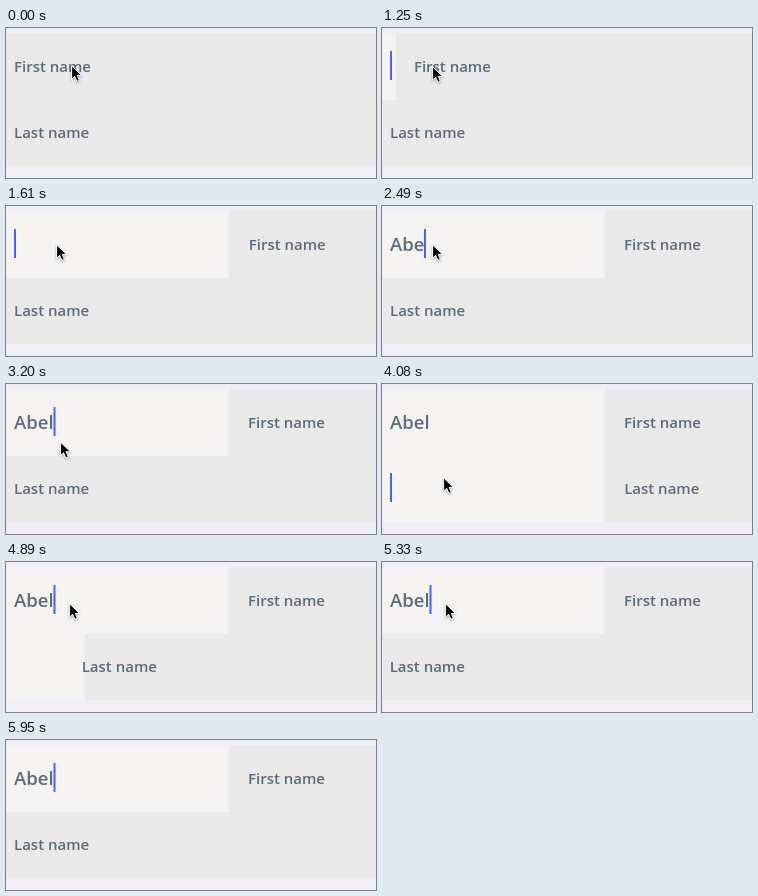
Write an HTML page that moves like this. It is 370 px wide and 150 px high and loops after 6130 ms.

```html
<!DOCTYPE html>
<html lang="en">
<head>
<meta charset="utf-8">
<title>Sliding form fields</title>
<style>
  html, body { margin: 0; width: 100%; height: 100%; overflow: hidden; }
  body { background: #efeef4; }
  #stage {
    position: relative; width: 370px; height: 150px; overflow: hidden;
    font-family: "Open Sans", Lato, sans-serif; font-weight: 600;
    color: #5d6b7c; white-space: pre;
  }
  .field { position: absolute; left: 0; width: 370px; height: 67px; overflow: hidden; background: #f4f3f2; }
  #first { top: 5px; z-index: 1; }
  #last { top: 71px; }
  .field > * { position: absolute; left: 0; top: 0; }
  .panel { width: 370px; height: 100%; background: #e9e9e9; }
  .label { left: 8px; top: 23px; font-size: 15px; line-height: 20px; }
  .value { left: 8px; top: 21px; font-size: 18.5px; line-height: 24px; }
  .caret { top: 18px; width: 2px; height: 29px; background: #4863ee; }
  #pointer { position: absolute; left: 0; top: 0; z-index: 2; overflow: visible; filter: drop-shadow(0 1px 1px rgba(0, 0, 0, .3)); }
</style>
</head>
<body>
<div id="stage">
  <div class="field" id="first">
    <div class="panel"></div>
    <div class="value"></div>
    <div class="caret"></div>
    <div class="label">First name</div>
  </div>
  <div class="field" id="last">
    <div class="panel"></div>
    <div class="caret"></div>
    <div class="label">Last name</div>
  </div>
  <svg id="pointer" width="12" height="18">
    <path d="M.6.8V14.2L3.7 11.3 5.9 16.4 8.4 15.3 6.2 10.3H10.5Z" fill="#000" stroke="#fff" stroke-width="1"/>
  </svg>
</div>
<script>
const LOOP = 6130, TICKS = 69, STEP = LOOP / TICKS / 1000;
const NAME = "Abel";
const typedAt = [24, 26, 28, 31];
const caretX = [8, 20, 31, 42, 47.5];
const pick = (s) => document.querySelector(s);
const pointer = pick("#pointer"), value = pick(".value");

// Pointer waypoints: tick, x, y
const route = [
  [2, 65, 37], [6, 50, 38], [34, 50, 38], [39, 61, 93],
  [47, 61, 93], [54, 63, 41], [61, 63, 41], [64, 400, 185]
];

// Underdamped spring for labels, critically damped one for panels
function bounce(x) {
  const d = 0.6 * x;
  return 1 - Math.exp(-0.8 * x) * (Math.cos(d) + 4 / 3 * Math.sin(d));
}
function glide(x) {
  const p = 1 - (1 + x) * Math.exp(-x);
  return p > 0.98 ? 1 : p;
}

// Each move: start tick, head start in seconds, label rate, panel rate
const openFirst = [14, 0.026, 20, 15.6];
const openLast = [42, 0.074, 20, 17];
const closeLast = [55, 0.151, 14, 14.6];

function progress(k, [start, lead, labelRate, panelRate]) {
  if (k < start) return [0, 0];
  const t = (k - start) * STEP + lead;
  return [bounce(t * labelRate), glide(t * panelRate)];
}

function slide(id, [label, panel]) {
  pick(id + " .label").style.transform = `translateX(${234 * label}px)`;
  pick(id + " .panel").style.transform = `translateX(${223 * panel}px)`;
}

function blink(age) {
  const a = age % 12;
  if (a === 7 || a === 11) return 0.5;
  return a < 7 ? 1 : 0;
}

function setCaret(id, x, alpha) {
  const s = pick(id + " .caret").style;
  s.transform = `translateX(${x}px)`;
  s.opacity = alpha;
}

function pointerAt(k) {
  let i = 0;
  while (i < route.length - 2 && k > route[i + 1][0]) i++;
  const [t0, x0, y0] = route[i], [t1, x1, y1] = route[i + 1];
  const u = Math.min(1, Math.max(0, (k - t0) / (t1 - t0)));
  const e = i === 6 ? u : u * u * (3 - 2 * u);
  return [x0 + (x1 - x0) * e, y0 + (y1 - y0) * e];
}

function draw(k) {
  const opened = progress(k, openLast), closed = progress(k, closeLast);
  slide("#first", progress(k, openFirst));
  slide("#last", opened.map((p, i) => p - closed[i]));

  const count = typedAt.filter((t) => k >= t).length;
  value.textContent = NAME.slice(0, count);

  const onLast = k >= 42 && k < 55;
  const since = k >= 55 ? 55 : count ? typedAt[count - 1] : 14;
  setCaret("#first", caretX[count], k < 14 || onLast ? 0 : blink(k - since));
  setCaret("#last", 8, onLast ? blink(k - 42) : 0);

  const [x, y] = pointerAt(k);
  pointer.style.transform = `translate(${x}px, ${y}px)`;
}

const begin = performance.now();
function frame() {
  const t = (performance.now() - begin) % LOOP;
  draw(Math.floor(t / LOOP * TICKS + 0.09) % TICKS);
  requestAnimationFrame(frame);
}
frame();
</script>
</body>
</html>
```
